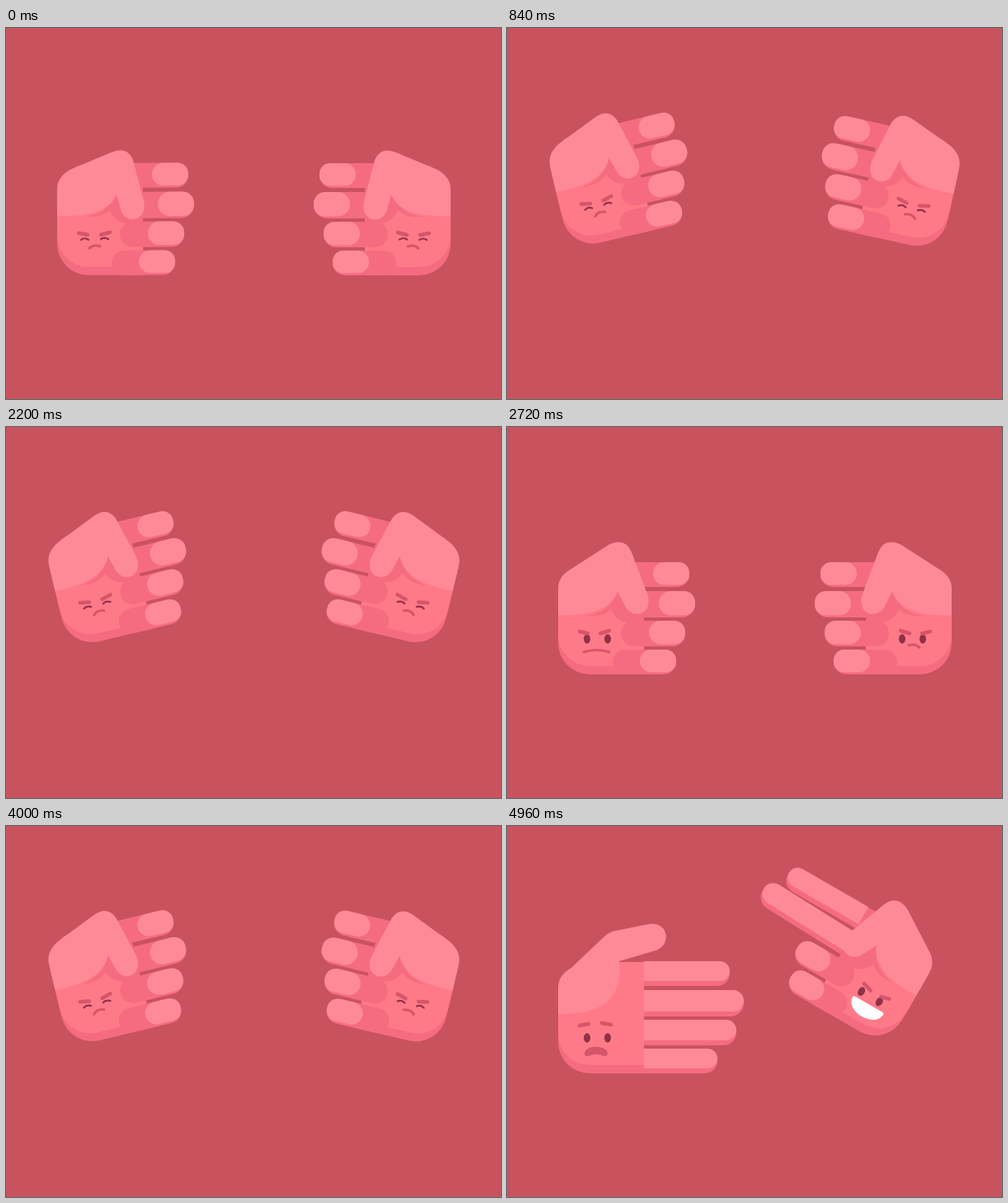
Animation, 600 px wide and 450 px high, one loop 5 s. Source, as an HTML page with a canvas:

```html
<!DOCTYPE html>
<html lang="en">
<head>
<meta charset="utf-8">
<title>Rock paper scissors</title>
<style>
html, body { margin: 0; width: 100%; height: 100%; overflow: hidden; background: #c9525f; }
canvas { display: block; }
</style>
</head>
<body>
<canvas id="stage" width="600" height="450"></canvas>
<script>
const c = document.getElementById('stage').getContext('2d');
const BG = '#c9525f', SKIN = '#ff7a88', LIGHT = '#ff8a97', SHADE = '#f56c80';
const LINE = '#d5556a', EYE = '#8f3147';
const LOOP = 5000, LAG = 40, BEAT = 560, ROUND2 = 3120;
const PIVOT = { x: 140, y: 225 };

// Thumb outlines share one command order, so poses can be blended.
const FIST = [128,151, 147,143, 154,160, 167,210, 172,233, 148,240, 140,223, 134,202, 127,219, 106,230];
const RAISED = [123,143, 143,133, 151,152, 171,205, 176,228, 152,234, 143,217, 134,199, 127,218, 106,230];
const OPEN = [118,134, 124,128, 132,127, 172,119, 196,115, 200,145, 180,151, 136,164, 140,203, 123,229];

// y, height, start when curled, tip when curled, tip when stretched, slip on impact
const FINGERS = [
  [164, 30, 140, 221, 270, 0],
  [199, 32, 134, 228, 287, 0],
  [235, 31, 138, 216, 278, 12],
  [270, 30, 128, 205, 255, 15]
];

const clamp = v => Math.max(0, Math.min(1, v));
const span = (t, from, to) => clamp((t - from) / (to - from));
const mix = (a, b, k) => a + (b - a) * k;
const blend = (a, b, k) => a.map((v, i) => mix(v, b[i], k));
const smooth = k => k * k * (3 - 2 * k);

function box(x, y, w, h, radii, color) {
  c.fillStyle = color;
  c.beginPath();
  c.roundRect(x, y, w, h, radii);
  c.fill();
}

function stroke(d, color, width) {
  c.strokeStyle = color;
  c.lineWidth = width;
  c.lineCap = 'round';
  c.stroke(new Path2D(d));
}

function shape(d, color) {
  c.fillStyle = color;
  c.fill(new Path2D(d));
}

function finger([y, h, start, curled, straight, slip], stretch, angle, loose) {
  const r = h / 2, left = r * (1 - stretch), slide = slip * loose;
  const tip = mix(curled + slide, straight, stretch);
  const x = mix(start + 2.2 * slide, 166, stretch);
  const pad = mix(curled - 44 + 2.2 * slide, 166, stretch);
  const padH = h - mix(2.5, 6, stretch);
  c.save();
  c.translate(155, y + r);
  c.rotate(angle * Math.PI / 180);
  c.translate(-155, -y - r);
  box(x, y, tip - x, h, [left, r, r, left], SHADE);
  box(pad, y, tip - pad, padH, [left, padH / 2, padH / 2, left], LIGHT);
  c.restore();
}

function thumb(p) {
  c.fillStyle = LIGHT;
  c.beginPath();
  c.moveTo(62, 228);
  c.lineTo(62, 196);
  c.quadraticCurveTo(62, 181, 78, 172);
  c.lineTo(p[0], p[1]);
  c.quadraticCurveTo(p[2], p[3], p[4], p[5]);
  c.lineTo(p[6], p[7]);
  c.bezierCurveTo(p[8], p[9], p[10], p[11], p[12], p[13]);
  c.lineTo(p[14], p[15]);
  c.bezierCurveTo(p[16], p[17], p[18], p[19], 62, 228);
  c.fill();
}

const MOUTHS = {
  small: () => stroke('M101 267.5Q106 262 114 265', LINE, 3),
  wide: () => stroke('M93 273Q109 268 124 273', LINE, 3),
  flat: () => stroke('M92 268H125', LINE, 3),
  sad: () => shape('M94 276C94 265 122 265 122 276Q122 280 117 279Q108 275 99 279Q94 280 94 276Z', LINE),
  grin: () => shape('M87 266H126Q128 266 128 268C127 288 86 288 85 268Q85 266 87 266Z', '#fff')
};

const BROWS = {
  squint: 'M88 249L99 251M115 251L126 248',
  angry: 'M88 248L98 250.5M113 250.5L124 247',
  stern: 'M88 241L99 244M117 244L128 240',
  worried: 'M88 242L99 240M115 239L126 241'
};

function face({ brows, mouth }) {
  if (brows === 'squint') {
    stroke('M91 257Q95 254 100 257M115 256.5Q119 253.5 124 256.5', EYE, 2.2);
  } else {
    c.fillStyle = EYE;
    for (const x of [97, 122]) {
      c.beginPath();
      c.ellipse(x, 257, 4, 5.7, 0, 0, 7);
      c.fill();
    }
  }
  stroke(BROWS[brows], LINE, 4.5);
  MOUTHS[mouth]();
}

function hand(pose, mirrored) {
  const a = pose.swing;
  c.save();
  if (mirrored) c.transform(-1, 0, 0, 1, 601, 0);
  // The fist swings on a long arc, as if from an elbow off to the side.
  c.translate(PIVOT.x + .2 * a - .014 * a * a + pose.dx, PIVOT.y + 3.5 * a + pose.dy);
  c.rotate((a + pose.turn) * Math.PI / 180);
  c.translate(-PIVOT.x, -PIVOT.y);
  box(62, 165, 104, 135, [40, 0, 0, 38], SHADE);
  box(62, 165, 104, 125, [40, 0, 0, 38], SKIN);
  if (pose.stretch[3] < .5) {
    shape('M134 200Q124 226 94 229Q117 231 126 221Q131 234 144 237L166 240V165H150Z', SHADE);
  }
  FINGERS.forEach((f, i) => finger(f, pose.stretch[i], pose.angles[i], pose.loose));
  thumb(pose.thumb);
  face(pose.face);
  c.restore();
}

const rise = (p, from) => mix(from, -13.5, 1 - (1 - span(p, 0, 300)) ** 2);
const drop = p => span(p, 430, BEAT) ** 2;

// One beat: ease up, hold, then drop ever faster.
function beat(p, from) {
  return p < 430 ? rise(p, from) : mix(-13.5, 13, drop(p));
}

function throwing(p) {
  if (p < 520) return rise(p, 13);
  if (p < 600) return mix(-13.5, 8, span(p, 520, 600) ** 2);
  return 8 * (1 - smooth(span(p, 600, 720)));
}

function handPose(t, u, right) {
  const second = u > ROUND2;
  const starts = second ? [ROUND2, 3680] : [0, 560, 1120, 1720];
  const last = starts.length - 1;
  let n = last;
  while (n && u < starts[n]) n--;
  const p = u - starts[n];
  const final = n === last;
  const swing = final ? throwing(p) : beat(p, n ? 13 : 0);
  const reveal = final ? smooth(span(p, 540, 620)) : 0;

  // Thumb and lower fingers slip on impact and recover at once.
  const since = n ? u - starts[n - 1] - BEAT : 80;
  const impact = final ? 0 : drop(p) * (1 - span(p, BEAT, BEAT + 80));
  const loose = Math.max(impact, 1 - span(since, 0, 80));

  const pose = {
    swing, loose, turn: 0, dx: 0, dy: 0,
    stretch: [0, 0, 0, 0], angles: [0, 0, 0, 0],
    thumb: blend(FIST, RAISED, loose),
    face: { brows: 'squint', mouth: 'small' }
  };
  if (!reveal) return pose;

  if (!second) {
    pose.thumb = blend(FIST, RAISED, reveal * (1 - smooth(span(t, 2800, 2960))));
    pose.face = { brows: 'angry', mouth: right ? 'small' : 'wide' };
    return pose;
  }

  const snip = t < 4760 ? 0 : (1 - Math.cos((t - 4760) / 100 * Math.PI)) / 2;
  if (right) {
    const lunge = smooth(span(t, 4480, 4760));
    const spread = t < 4760 ? reveal * (1 - lunge) : snip;
    pose.turn = -30 * lunge;
    pose.dx = 31 * lunge;
    pose.dy = -61 * lunge;
    pose.stretch = [reveal, reveal, 0, 0];
    pose.angles = [-11.8 * spread, mix(-2, 6, spread) * reveal, 0, 0];
    pose.thumb = blend(FIST, RAISED, reveal);
    pose.face = { brows: 'angry', mouth: 'grin' };
  } else {
    pose.swing += 4.5 * snip;
    pose.dx = -18 * Math.sin(Math.PI * span(t, 4520, 4780));
    pose.stretch = Array(4).fill(reveal);
    pose.thumb = blend(FIST, OPEN, reveal);
    pose.face = t < 4560 ? { brows: 'stern', mouth: 'flat' } : { brows: 'worried', mouth: 'sad' };
  }
  return pose;
}

function draw(now) {
  const t = now % LOOP;
  c.fillStyle = BG;
  c.fillRect(0, 0, 600, 450);
  hand(handPose(t, t, false), false);
  hand(handPose(t, Math.max(0, t - LAG), true), true);
}

const began = performance.now();
function tick() {
  draw(performance.now() - began);
  requestAnimationFrame(tick);
}
tick();
</script>
</body>
</html>
```
